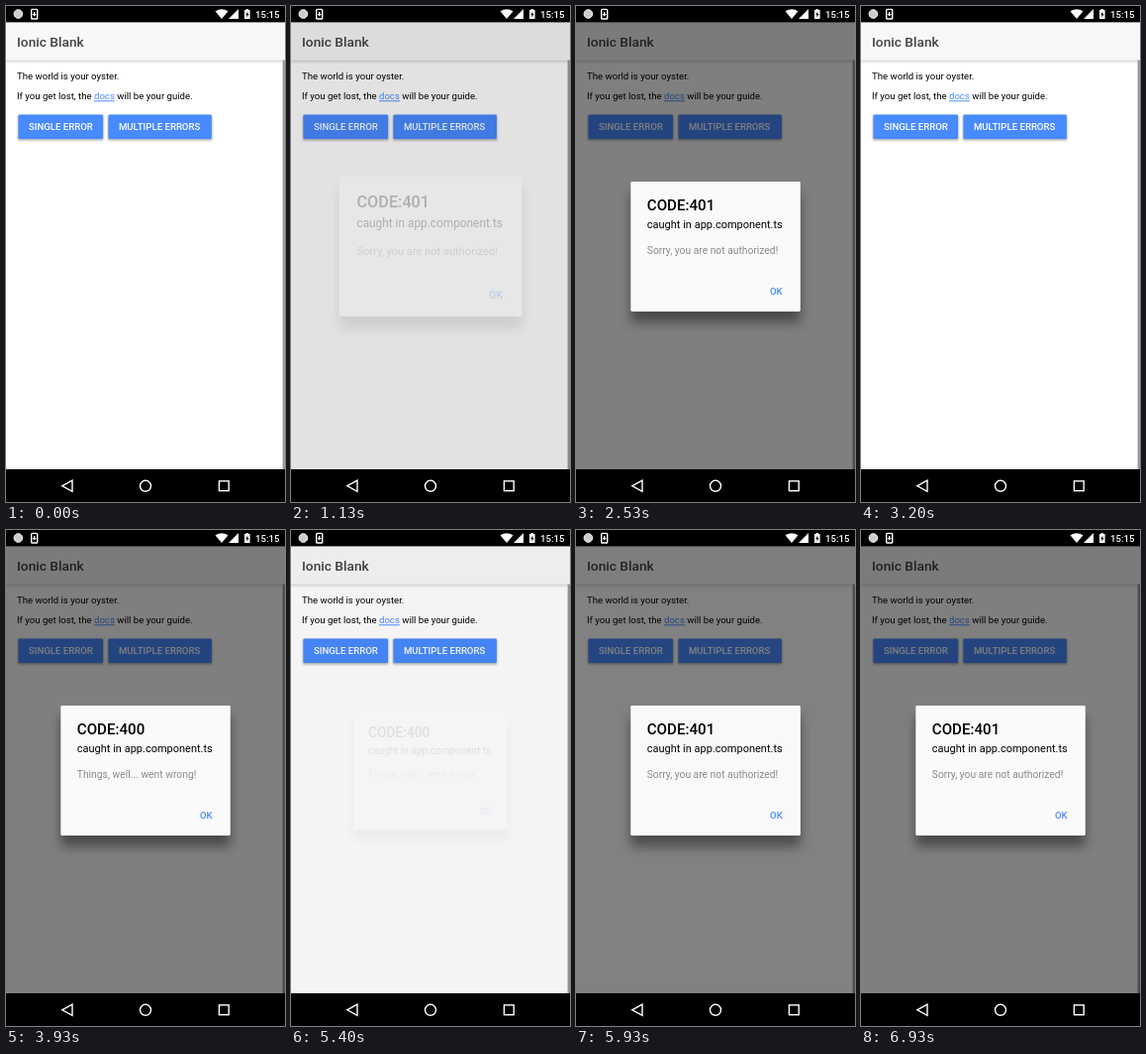
These frames come from a looping animation (282 by 500 pixels, 6990 ms). An HTML page:

```html
<!DOCTYPE html>
<html lang="en">
<head>
<meta charset="utf-8">
<title>Alert demo</title>
<style>
  html, body { margin: 0; width: 100%; height: 100%; overflow: hidden; background: #000; }
  svg { display: block; width: 282px; height: 500px; }
  text { font: 9.6px Roboto, sans-serif; white-space: pre; }
  .medium { font-weight: 500; }
  .link { fill: #488aff; text-decoration: underline; }
  .button { fill: #488aff; }
  .label { fill: #fff; font-weight: 500; }
  .soft { filter: blur(1.1px); opacity: .32; }
  .icon { fill: none; stroke: #fff; stroke-width: 1.4; }

  .backdrop, .alert, .pane {
    animation: 6990ms cubic-bezier(.36, .66, .04, 1) infinite paused;
  }
  .backdrop { animation-name: dim; }
  .alert { animation-name: pop; transform-origin: 141px 242.5px; }
  .pane { animation-timing-function: step-end; }
  .denied { animation-name: denied; }
  .failed { animation-name: failed; }
  .alert .title { font-size: 15.1px; font-weight: 500; }
  .alert .sub { font-size: 11px; }
  .alert .message { font-size: 10.3px; fill: #8a8a8a; }
  .alert .shadow { filter: blur(6px); opacity: .42; }

  @keyframes dim {
    0%, 15.89%, 40.66%, 51.13%, 78.76%, 82.56% { opacity: 0; }
    18.76%, 37.8%, 53.99%, 75.89%, 85.42%, 100% { opacity: .5; }
  }
  @keyframes pop {
    0%, 15.89%, 40.67%, 51.13%, 78.77%, 82.56% { opacity: 0; transform: scale(1.1); }
    18.76%, 37.8%, 53.99%, 75.89%, 85.42%, 100% { opacity: 1; transform: scale(1); }
    40.66%, 78.76% { opacity: 0; transform: scale(.9); }
  }
  @keyframes denied {
    0%, 80%, 100% { visibility: visible; }
    45% { visibility: hidden; }
  }
  @keyframes failed {
    0%, 80%, 100% { visibility: hidden; }
    45% { visibility: visible; }
  }
</style>
</head>
<body>
<svg viewBox="0 0 282 500">
  <defs>
    <linearGradient id="edge" x2="0" y2="1">
      <stop stop-opacity=".2"/>
      <stop offset=".4" stop-opacity=".08"/>
      <stop offset="1" stop-opacity="0"/>
    </linearGradient>
  </defs>

  <!-- page -->
  <rect y="16" width="282" height="451" fill="#fff"/>
  <rect y="54.5" width="282" height="4" fill="url(#edge)"/>
  <rect y="16" width="282" height="38.6" fill="#f8f8f8"/>
  <text class="medium" x="11" y="40.5" fill="#424242" style="font-size:13.7px">Ionic Blank</text>
  <text x="11" y="74">The world is your oyster.</text>
  <text x="11" y="94.3">If you get lost, the <tspan class="link">docs</tspan> will be your guide.</text>

  <rect class="soft" x="12" y="110.5" width="86.4" height="25"/>
  <rect class="button" x="12.4" y="109.4" width="85.7" height="24.7" rx="1.4"/>
  <text class="label" x="22.9" y="124.8">SINGLE ERROR</text>
  <rect class="soft" x="103" y="110.5" width="105.2" height="25"/>
  <rect class="button" x="103.4" y="109.4" width="104.5" height="24.7" rx="1.4"/>
  <text class="label" x="113.9" y="124.8">MULTIPLE ERRORS</text>

  <rect x="279.6" y="54.6" width="2.4" height="412.4" fill="#999"/>

  <!-- alert -->
  <rect class="backdrop" y="16" width="282" height="451"/>
  <g class="alert">
    <rect class="shadow" x="55.3" y="188" width="171.5" height="131"/>
    <rect x="55.3" y="177" width="171.5" height="131" rx="1.4" fill="#fafafa"/>
    <g class="pane denied">
      <text class="title" x="71.8" y="206">CODE:401</text>
      <text class="message" x="71.8" y="250">Sorry, you are not authorized!</text>
    </g>
    <g class="pane failed">
      <text class="title" x="71.8" y="206">CODE:400</text>
      <text class="message" x="71.8" y="250">Things, well... went wrong!</text>
    </g>
    <text class="sub" x="71.8" y="224">caught in app.component.ts</text>
    <text class="medium" x="196" y="291.4" fill="#488aff">OK</text>
  </g>

  <!-- status bar -->
  <rect width="282" height="16.4"/>
  <circle cx="12.4" cy="8" r="4.3" fill="#ccc" stroke="#fff"/>
  <rect class="icon" x="25.7" y="3.4" width="6" height="9.6" rx=".8"/>
  <path d="M28 6h1.4v2h1.5l-2.2 2.4-2.2-2.4h1.5z" fill="#fff"/>
  <path d="M211.5 5.2q6.5-4 13 0L218 13z" fill="#fff"/>
  <path d="M235 3v10h-10z" fill="#fff"/>
  <path d="M241 4h1.6v-1h2.4v1h1.6v9h-5.6z" fill="#fff"/>
  <path d="M244.3 5.6l-2 3.4h1.2v2.6l2-3.6h-1.2z"/>
  <text class="medium" x="252" y="12" fill="#fff">15:15</text>

  <!-- navigation bar -->
  <rect y="467" width="282" height="33"/>
  <path class="icon" d="M67 478.2v11.2l-10.2-5.6z"/>
  <circle class="icon" cx="141" cy="483.8" r="5.5"/>
  <rect class="icon" x="215.4" y="478.9" width="9.8" height="9.8"/>
</svg>
<script>
  const LOOP = 6990, TICK = LOOP / 105;
  const animations = document.getAnimations();
  const start = performance.now();

  function draw() {
    const time = (performance.now() - start) % LOOP;
    const held = Math.floor((time + 4) / TICK) * TICK % LOOP;
    for (const animation of animations) animation.currentTime = held;
    requestAnimationFrame(draw);
  }
  draw();
</script>
</body>
</html>
```
